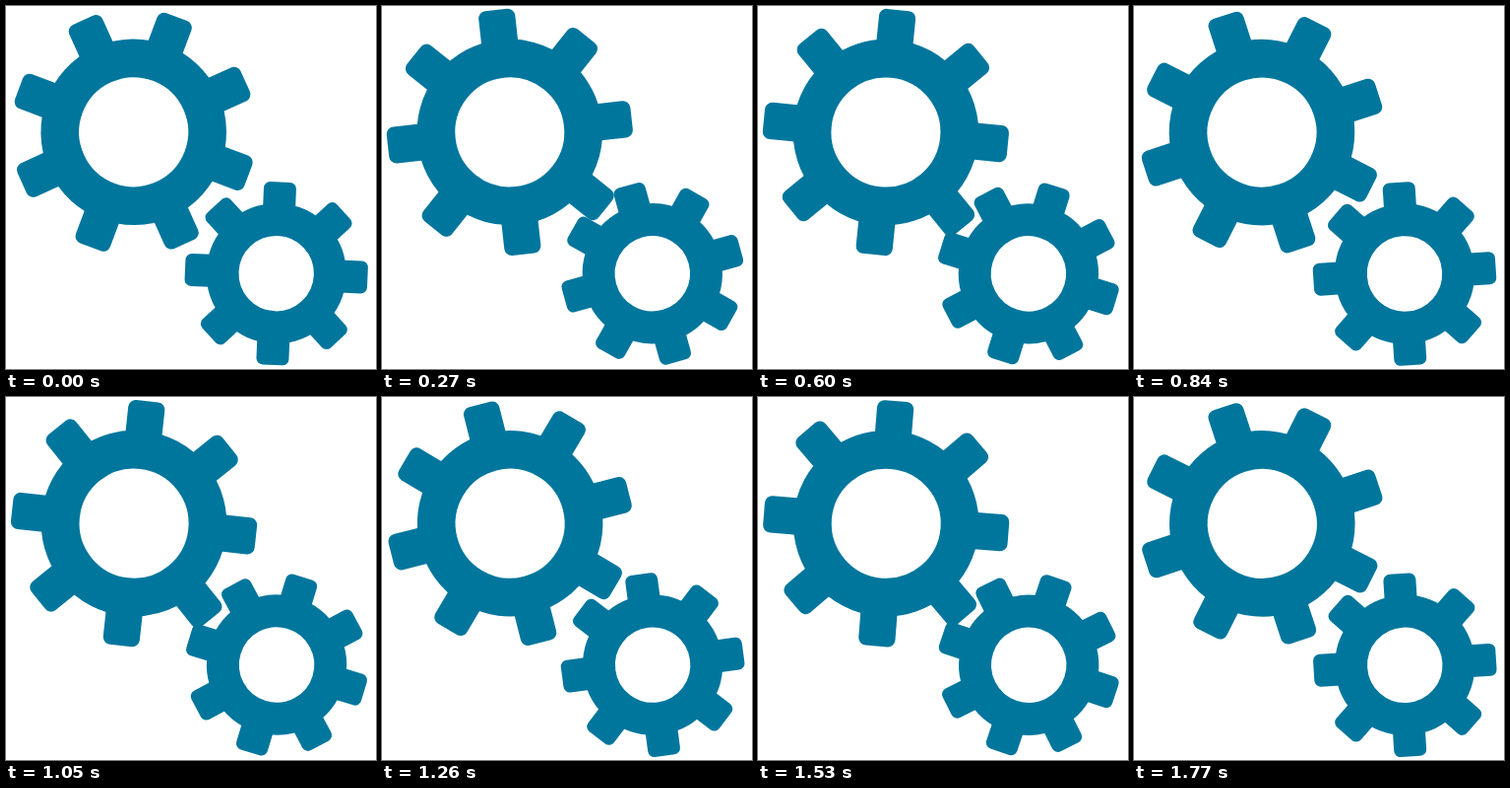
Write an HTML page with a canvas that moves like this. It is 376 px wide and 368 px high and loops after 1800 ms.

```html
<!DOCTYPE html>
<html lang="en">
<head>
<meta charset="utf-8">
<title>Turning gears</title>
<style>
  html, body { margin: 0; width: 100%; height: 100%; overflow: hidden; background: #fff; }
  canvas { display: block; }
</style>
</head>
<body>
<canvas width="376" height="368"></canvas>
<script>
const ctx = document.querySelector('canvas').getContext('2d');
const STEP = 30, STEPS = 60, TEETH = 8;

const big = { x: 129.7, y: 127.8, hole: 55.5, body: 94.3, tip: 124.6, tooth: 37.3, corner: 7.5 };
const small = { x: 274.7, y: 271.2, hole: 38.2, body: 71, tip: 92.8, tooth: 33, corner: 6.5 };

function drawGear(g, degrees, drift) {
  ctx.save();
  ctx.translate(g.x + drift, g.y + drift);
  ctx.rotate(degrees * Math.PI / 180);

  const middle = (g.body + g.hole) / 2;
  ctx.lineWidth = g.body - g.hole;
  ctx.beginPath();
  ctx.arc(0, 0, middle, 0, 2 * Math.PI);
  ctx.stroke();

  for (let i = 0; i < TEETH; i++) {
    ctx.beginPath();
    ctx.roundRect(-g.tooth / 2, -g.tip, g.tooth, g.tip - middle, [g.corner, g.corner, 0, 0]);
    ctx.fill();
    ctx.rotate(2 * Math.PI / TEETH);
  }
  ctx.restore();
}

const start = performance.now();

function draw() {
  const n = Math.floor((performance.now() - start) / STEP) % STEPS;
  const turn = 3 * n - 1.5e-5 * n ** 3; // slows slightly towards the end of the loop
  const drift = n / 100;

  ctx.clearRect(0, 0, 376, 368);
  ctx.fillStyle = ctx.strokeStyle = '#00769d';
  drawGear(big, 20.6 - turn, drift);
  drawGear(small, 2.5 + turn, drift);
  requestAnimationFrame(draw);
}
draw();
</script>
</body>
</html>
```
